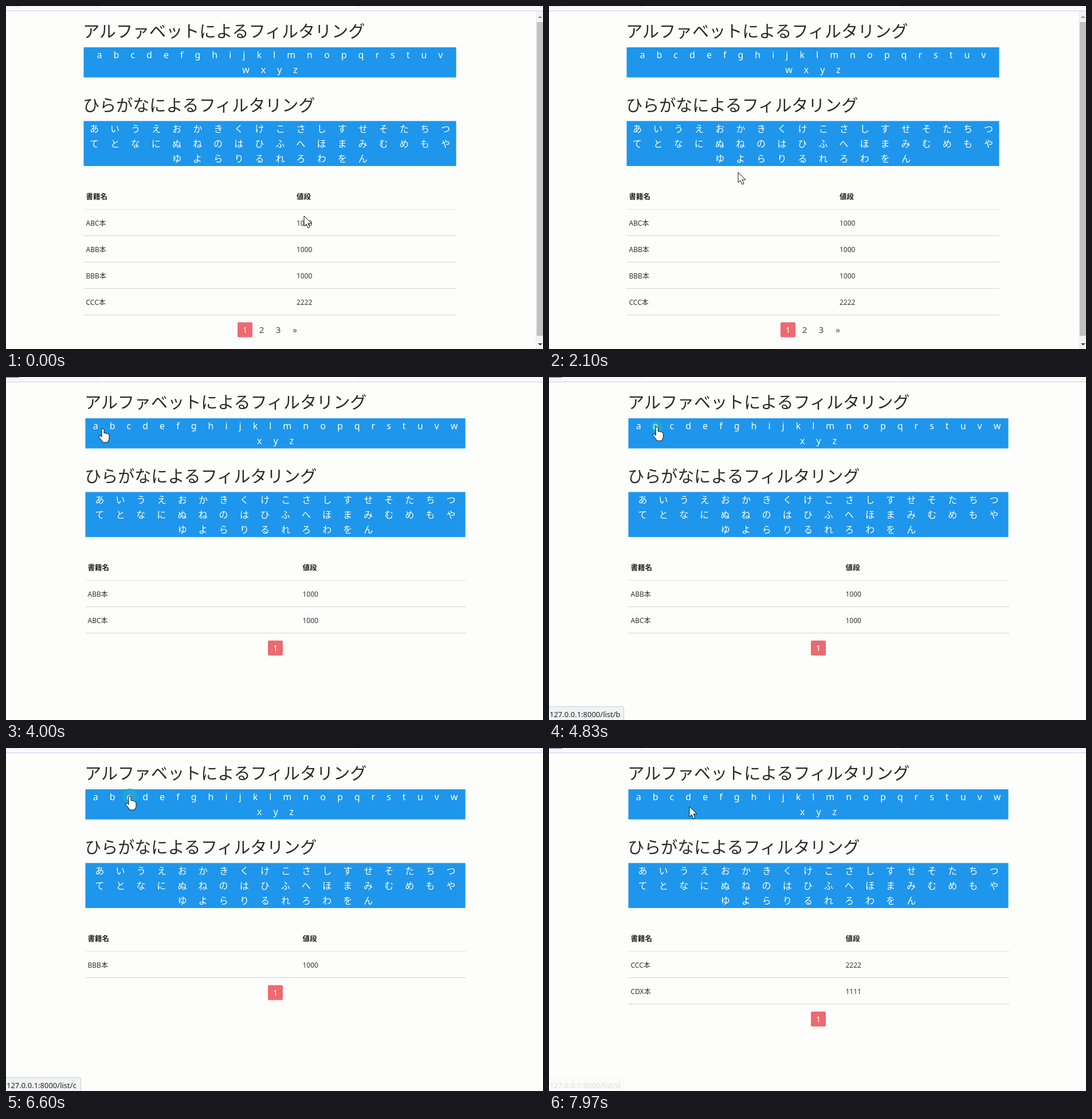
An HTML page for the animation above (8 s loop, 937 px wide and 598 px high).

```html
<!DOCTYPE html>
<html lang="ja">
<head>
<meta charset="utf-8">
<title>フィルタリング</title>
<style>
  html, body { margin: 0; width: 100%; height: 100%; overflow: hidden; background: #fdfdfc; }
  svg { display: block; }
  text { font-family: "Noto Sans", "Noto Sans CJK JP", sans-serif; white-space: pre; }
  .heading { font: 300 29.05px "Noto Sans CJK JP Light", "Noto Sans CJK JP", sans-serif; fill: #2a2a2a; }
  .links { font-size: 16px; fill: #fff; text-anchor: middle; }
  .th { font: bold 12.5px "Noto Sans CJK JP", sans-serif; fill: #222; }
  .td { font-size: 12px; fill: #333; }
  .page { font-size: 15px; fill: #444; text-anchor: middle; }
  .cursor { fill: #fff; stroke: #111; stroke-width: 1; stroke-linejoin: round; }
</style>
</head>
<body>
<svg width="937" height="598" viewBox="0 0 937 598">
  <rect width="937" height="598" fill="#fdfdfc"/>
  <rect width="937" height="5" fill="#f7f7f6"/>
  <rect x="164" y="-10" width="450" height="13" rx="6" fill="#fff"/>
  <rect y="8" width="937" height="1" fill="#c9c8f2"/>
  <rect id="blink" width="23" height="1"/>
  <g id="page"></g>
  <g id="status">
    <path d="M-1 574.5H128.500Q130.500 574.500 130.500 576.500V599H-1Z" fill="#f1f2f3" stroke="#d0d0d0"/>
    <text id="url" x="1" y="593" font-size="13" fill="#222"></text>
  </g>
  <circle id="ripple" fill="#3fd0c8" fill-opacity=".3" stroke="#18b5b8" stroke-width="3"/>
  <g id="cursor" class="cursor">
    <path id="arrow" d="M0 0V18L4 14.300L7 21L10 19.700L7 13H13Z"/>
    <path id="hand" d="M-2 1.500Q-2 0 0 0T2 1.500V8Q4 6.500 5.500 8.500Q7.500 7.500 8.500 9.500Q11 9 11 11.500V17Q11 20 9 22V24H-1V22L-6.500 15Q-8 12.500 -6 12Q-4.500 12 -2 14.500Z"/>
  </g>
</svg>
<script>
const LOOP = 8000;
const byId = id => document.getElementById(id);

const KANA = ["あいうえおかきくけこさしすせそたちつ", "てとなにぬねのはひふへほまみむめもや", "ゆよらりるれろわをん"];
const WIDE = { left: 138.5, right: 801.5, ruleEnd: 803, price: 517.5,
  letters: ["abcdefghijklmnopqrstuvw", "xyz"], pages: "1" };
const NARROW = { left: 135.5, right: 785.5, ruleEnd: 785.5, price: 507,
  letters: ["abcdefghijklmnopqrstuv", "wxyz"], pages: "123»", scrollbar: true };

const VIEWS = [
  { from: 0, layout: NARROW, books: [["ABC本", 1000], ["ABB本", 1000], ["BBB本", 1000], ["CCC本", 2222]] },
  { from: 3700, layout: WIDE, books: [["ABB本", 1000], ["ABC本", 1000]] },
  { from: 5000, layout: WIDE, books: [["BBB本", 1000]] },
  { from: 6850, layout: WIDE, books: [["CCC本", 2222], ["CDX本", 1111]] }
];

// Pointer path: time, x, y
const PATH = [
  [0, 520, 366], [450, 715, 440], [800, 610, 460], [1300, 290, 320], [1700, 290, 320],
  [2100, 330, 290], [2530, 271, 238], [2960, 177, 98], [3080, 177, 98], [3380, 162, 88],
  [3750, 162, 88], [4000, 169, 90], [4150, 169, 90], [4550, 188, 87], [5700, 190, 88],
  [6250, 216, 84], [7200, 216, 84], [7900, 245, 102], [8000, 245, 102]
];
const CLICKS = [1400, 3480, 4750, 6480];
const HANDS = [[3250, 5400], [5700, 7840]];
const HIDDEN = [5400, 5700];
const STATUSES = [[3420, 3700, "a"], [4450, 5000, "b"], [6000, 6850, "c"], [7600, 7850, "d"]];
const FADE = 140;

const within = (t, [start, end]) => t >= start && t < end;
const text = (kind, x, y, content, extra = "") => `<text class="${kind}" x="${x}" y="${y}" ${extra}>${content}</text>`;
const box = (x, y, w, h, fill, extra = "") => `<rect x="${x}" y="${y}" width="${w}" height="${h}" fill="${fill}" ${extra}/>`;

function linkBand({ left, right }, top, rows, baseline, gap) {
  const spaced = row => `dx="0${` ${gap}`.repeat(row.length - 1)}"`;
  return box(left, top, right - left, rows.length * 26 + 0.5, "#1e96ec") +
    rows.map((row, i) => text("links", (left + right) / 2, baseline + i * 26.2, row, spaced(row))).join("");
}

function pagination({ left, right, pages }, top) {
  const first = (left + right) / 2 - (pages.length - 1) * 14.5;
  return box(first - 13, top, 26, 26, "#ec6a70", 'rx="2"') +
    [...pages].map((p, i) => text("page", first + i * 29, top + 18.5, p, i ? "" : 'style="fill:#fff"')).join("");
}

function scrollbar() {
  return box(924, 9, 13, 589, "#f3f3f3") + box(926, 28, 11, 547, "#c1c1c1") +
    '<path d="M928 21L932 17L936 21Z" fill="#999"/><path d="M928 588L932 592L936 588Z" fill="#444"/>';
}

function renderPage({ layout, books }) {
  const { left, price, ruleEnd } = layout;
  const rule = i => box(left, 354 + i * 46, ruleEnd - left, 1, i ? "#d4d4d4" : "#e6e6e6");
  return text("heading", left - 1.3, 55.4, "アルファベットによるフィルタリング") +
    linkBand(layout, 72, layout.letters, 91, 20) +
    text("heading", left - 1.3, 184, "ひらがなによるフィルタリング") +
    linkBand(layout, 200.5, KANA, 219.5, 20.06) +
    text("th", left + 4, 336.7, "書籍名") + text("th", price, 336.7, "値段") + rule(0) +
    books.map(([name, cost], i) =>
      text("td", left + 4, 382.6 + i * 46, name) + text("td", price, 382.6 + i * 46, cost) + rule(i + 1)).join("") +
    pagination(layout, 367.5 + books.length * 46) +
    (layout.scrollbar ? scrollbar() : "");
}

function pointerAt(t) {
  const i = PATH.findIndex(p => p[0] > t);
  const [t0, x0, y0] = PATH[i - 1], [t1, x1, y1] = PATH[i];
  const k = (t - t0) / (t1 - t0), e = k * k * (3 - 2 * k);
  return [x0 + (x1 - x0) * e, y0 + (y1 - y0) * e];
}

function drawPointer(t) {
  const [x, y] = pointerAt(t);
  const hand = HANDS.some(span => within(t, span));
  byId("cursor").setAttribute("transform", `translate(${x} ${y})`);
  byId("cursor").style.display = within(t, HIDDEN) ? "none" : "";
  byId("hand").style.display = hand ? "" : "none";
  byId("arrow").style.display = hand ? "none" : "";

  const ripple = byId("ripple");
  const click = CLICKS.find(c => within(t, [c, c + 240]));
  ripple.style.display = click === undefined ? "none" : "";
  if (click !== undefined) {
    const k = (t - click) / 240;
    ripple.setAttribute("cx", x);
    ripple.setAttribute("cy", y);
    ripple.setAttribute("r", 1 + 22 * k);
    ripple.setAttribute("opacity", 0.9 * (1 - k * k));
  }
}

function drawStatus(t) {
  const shown = STATUSES.find(([start, end]) => within(t, [start, end + FADE]));
  byId("status").style.display = shown ? "" : "none";
  if (!shown) return;
  byId("url").textContent = "127.0.0.1:8000/list/" + shown[2];
  byId("status").style.opacity = Math.min(1, (t - shown[0]) / FADE, 1 - (t - shown[1]) / FADE);
}

let currentView;
function draw(now) {
  const t = now % LOOP;
  const view = VIEWS.findLast(v => t >= v.from);
  if (view !== currentView) {
    byId("page").innerHTML = renderPage(view);
    currentView = view;
  }
  byId("blink").setAttribute("fill", t / 1040 % 1 >= 0.5 ? "#6d5fa8" : "#dedbe6");
  drawStatus(t);
  drawPointer(t);
}

let start;
function tick(now) {
  start ??= now;
  draw(Math.max(0, now - start));
  requestAnimationFrame(tick);
}
draw(0);
requestAnimationFrame(tick);
</script>
</body>
</html>
```
